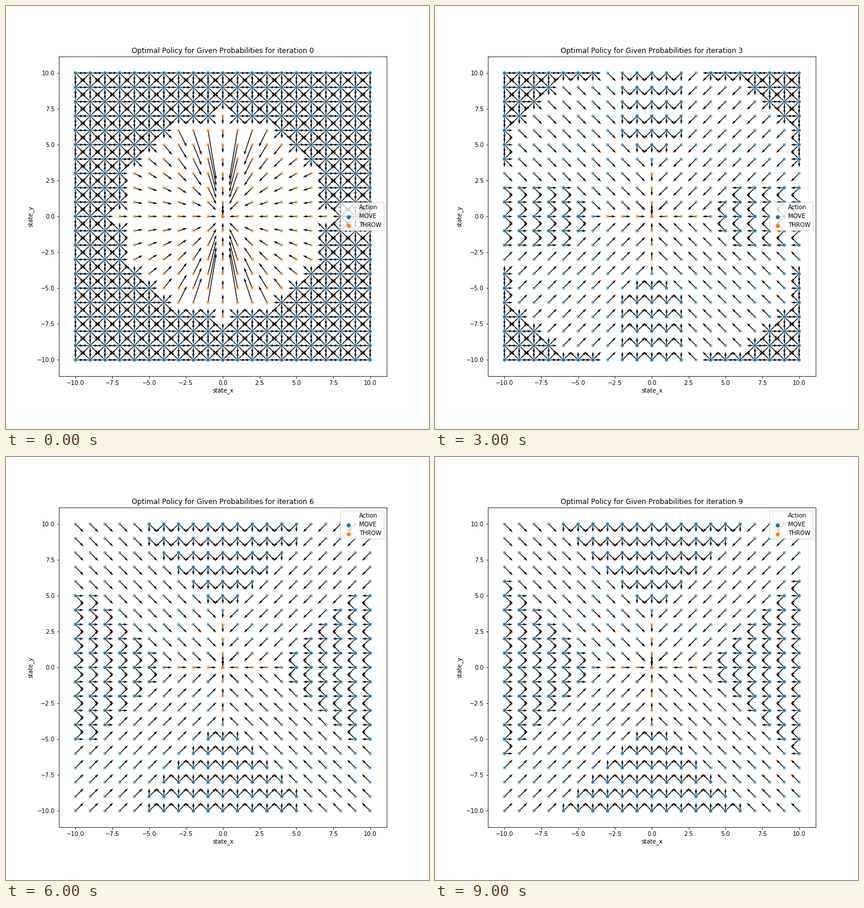
These frames come from a looping animation (720 by 720 pixels, 10000 ms). A matplotlib script:

```python
import itertools

import matplotlib.pyplot as plt
import numpy as np
from matplotlib.animation import FuncAnimation

N = 10                 # grid runs from -N to N
REACH2 = 49            # squared throwing reach
MOVE, THROW = "#1f77b4", "#ff7f0e"
STEPS = [s for s in itertools.product((-1, 0, 1), repeat=2) if s != (0, 0)]

plt.rcParams.update({"font.family": "DejaVu Sans", "text.kerning_factor": 6})
fig = plt.figure(figsize=(10, 10), dpi=72)
fig.subplots_adjust(left=0.125, right=0.9, bottom=0.125, top=0.88)
ax = fig.add_subplot()


def sign(v):
    return (v > 0) - (v < 0)


def throw_dir(x, y):
    """Arrow with unit x part, pointing at the centre."""
    if x == 0:
        return 0, -sign(y) or 1
    return -sign(x), -y / abs(x)


def inward(far, near, k):
    """Equally good steps along the far axis, as shifts of the near one."""
    room = min(far - 4, k - 1)
    if far >= 4 and abs(near) <= room:
        return [d for d in (-1, 0, 1) if abs(near + d) <= room]
    return [-sign(near)]


def moves(x, y, k):
    gap2 = sum(max(abs(v) - k, 0) ** 2 for v in (x, y))
    if gap2 > REACH2:
        return [(u, v) for u, v in STEPS if abs(x + u) <= N and abs(y + v) <= N]
    if abs(y) > abs(x):
        return [(d, -sign(y)) for d in inward(abs(y), x, k)]
    return [(-sign(x), d) for d in inward(abs(x), y, k)]


def actions(x, y, k):
    """List of (colour, direction) for one state at iteration k."""
    aim = [(THROW, throw_dir(x, y))]
    if x == y == 0:
        return aim * 8
    if k == 0:
        if x * x + y * y <= REACH2:
            return aim
    elif x * y == 0 and abs(x + y) <= 3:
        return aim
    walk = [(MOVE, d) for d in moves(x, y, k)]
    if k and abs(x) == abs(y) == 1:
        return aim + walk
    return walk


def draw(k):
    ax.clear()
    rows = [(x, y, u, v, c)
            for x, y in itertools.product(range(-N, N + 1), repeat=2)
            for c, (u, v) in actions(x, y, k)]
    x, y, u, v, colors = zip(*rows)
    ax.quiver(x, y, np.array(u, float), np.array(v, float),
              scale=40, width=0.0024, color="k")
    ax.scatter(x, y, s=36, c=colors, alpha=0.5, edgecolors="w", linewidths=0.48)

    ax.scatter([], [], s=0, color="w", label="Action")
    ax.scatter([], [], color=MOVE, label="MOVE")
    ax.scatter([], [], color=THROW, label="THROW")
    ax.legend(loc="center right" if k < 5 else "upper right")

    ax.set(xlim=(-11.125, 11.125), ylim=(-11.13, 11.13),
           xticks=np.arange(-10, 10.1, 2.5), yticks=np.arange(-10, 10.1, 2.5),
           xlabel="state_x", ylabel="state_y",
           title=f"Optimal Policy for Given Probabilities for iteration {k}")


anim = FuncAnimation(fig, draw, frames=10, interval=1000, repeat=True,
                     repeat_delay=0, blit=False)
plt.show()
```
